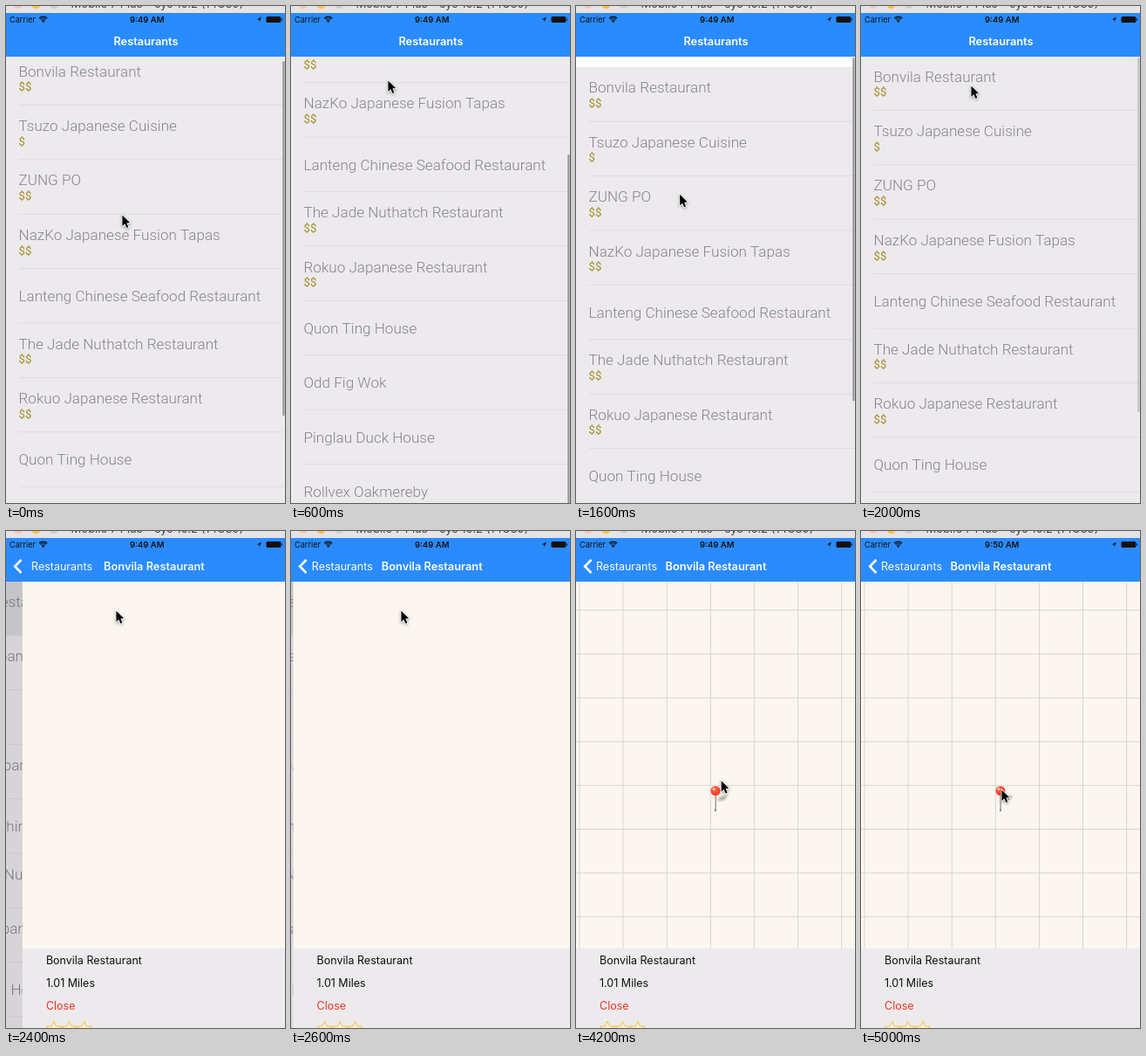
An HTML page with a canvas that plays this animation: 320 by 569 pixels, repeating every 5.1 s.

```html
<!DOCTYPE html>
<html lang="en">
<head>
<meta charset="utf-8">
<title>Restaurants</title>
<style>
  html, body { margin: 0; width: 100%; height: 100%; overflow: hidden; background: #edeaee; }
  canvas { display: block; width: 100vw; height: 100vh; }
</style>
</head>
<body>
<canvas id="stage"></canvas>
<script>
const W = 320, H = 569, LOOP = 5100, STEP = 100;
const BAR_TOP = 8, BAR_BOTTOM = 58, LIST_TOP = 57, ROW = 62.4, PANEL_TOP = 478;
const PUSH_START = 2120, MAP_LOADED = 2750, MINUTE_TURN = 4400;
const BLUE = '#2a8bff', PALE = '#edeaee', INK = '#111';
const UI = 'Inter, sans-serif';
const LIGHT = '300 17.1px Roboto, "Liberation Sans", sans-serif';
const PRICE = '13.2px Roboto, "Liberation Sans", sans-serif';

const places = [
  ['Bonvila Restaurant', '$$'],
  ['Tsuzo Japanese Cuisine', '$'],
  ['ZUNG PO', '$$'],
  ['NazKo Japanese Fusion Tapas', '$$'],
  ['Lanteng Chinese Seafood Restaurant', ''],
  ['The Jade Nuthatch Restaurant', '$$'],
  ['Rokuo Japanese Restaurant', '$$'],
  ['Quon Ting House', ''],
  ['Odd Fig Wok', ''],
  ['Pinglau Duck House', ''],
  ['Rollvex Oakmereby', '']
];

// Keyframes: [time, value...]
const scrollKeys = [[0, 6], [600, 156.5], [1200, -51], [1300, -51], [1750, 0]];
const scrollBarKeys = [[0, 1], [1850, 1], [2150, 0]];
const cursorKeys = [
  [0, 133, 239], [600, 111, 85], [1200, 113, 313], [1300, 113, 313],
  [1950, 126, 91], [2700, 126, 91], [3500, 168, 282], [3900, 168, 282], [4800, 161, 296]
];

const canvas = document.getElementById('stage');
const ctx = canvas.getContext('2d');
const ratio = window.devicePixelRatio || 1;
canvas.width = Math.round(W * ratio);
canvas.height = Math.round(H * ratio);

const smooth = u => (1 - Math.cos(Math.PI * u)) / 2;

function sample(keys, t) {
  const next = keys.findIndex(k => k[0] > t);
  if (next < 0) return keys[keys.length - 1].slice(1);
  const a = keys[next - 1], b = keys[next];
  const u = smooth((t - a[0]) / (b[0] - a[0]));
  return a.slice(1).map((v, i) => v + (b[i + 1] - v) * u);
}

function rect(x, y, w, h, color) {
  ctx.fillStyle = color;
  ctx.fillRect(x, y, w, h);
}

function text(str, x, y, font, color, align = 'left') {
  ctx.font = font;
  ctx.fillStyle = color;
  ctx.textAlign = align;
  ctx.fillText(str, x, y);
}

function polygon(points) {
  ctx.beginPath();
  points.forEach(([x, y]) => ctx.lineTo(x, y));
  ctx.closePath();
}

function disc(x, y, r, color) {
  ctx.fillStyle = color;
  ctx.beginPath();
  ctx.arc(x, y, r, 0, 7);
  ctx.fill();
}

function line(x1, y1, x2, y2, color, width = 1) {
  ctx.strokeStyle = color;
  ctx.lineWidth = width;
  ctx.beginPath();
  ctx.moveTo(x1, y1);
  ctx.lineTo(x2, y2);
  ctx.stroke();
}

function drawList(scroll, selected) {
  const top = LIST_TOP - scroll;
  rect(0, LIST_TOP, W, H - LIST_TOP, '#fff');
  rect(0, Math.max(top, LIST_TOP), W, H, PALE);
  places.forEach(([name, price], i) => {
    const y = top + i * ROW;
    if (i === selected) rect(0, y, W, ROW, '#d9d8da');
    text(name, 14.5, y + (price ? 29.6 : 37.5), LIGHT, '#86848a');
    text(price, 14.5, y + 46.3, PRICE, '#9d8c1c');
    rect(14.5, y + ROW - 0.5, W, 1, '#dfdce0');
  });
}

function drawScrollBar(scroll, alpha) {
  const y = 59 + Math.max(scroll, 0) * 0.71;
  ctx.globalAlpha = alpha;
  ctx.fillStyle = '#98969a';
  ctx.beginPath();
  ctx.roundRect(317.3, y, 2.3, 406 + Math.min(scroll, 0), 1.1);
  ctx.fill();
  ctx.globalAlpha = 1;
}

function drawPin() {
  ctx.save();
  ctx.translate(168, 306);
  ctx.rotate(-0.4);
  ctx.scale(1, 0.5);
  const shade = ctx.createRadialGradient(0, 0, 0, 0, 0, 8);
  shade.addColorStop(0, 'rgba(60,55,50,.45)');
  shade.addColorStop(1, 'rgba(60,55,50,0)');
  disc(0, 0, 8, shade);
  ctx.restore();
  line(160, 302, 160, 320, '#a3a09d', 2);
  line(159.6, 302, 159.6, 318, '#d2d0ce', 0.8);
  disc(160, 320, 1, '#77736f');
  const red = ctx.createRadialGradient(158, 295, 1, 160, 297.5, 6);
  red.addColorStop(0, '#ff6a50');
  red.addColorStop(1, '#f23a22');
  disc(160, 297.5, 5.5, red);
  disc(158, 295.6, 1.4, '#ffd5cb');
}

function drawStar(cx, cy) {
  polygon(Array.from({ length: 10 }, (_, i) => {
    const a = i * Math.PI / 5 - Math.PI / 2, r = i % 2 ? 4 : 9;
    return [cx + r * Math.cos(a), cy + r * Math.sin(a)];
  }));
  ctx.fillStyle = '#f8f1d4';
  ctx.strokeStyle = '#f1c640';
  ctx.lineWidth = 1;
  ctx.fill();
  ctx.stroke();
}

function drawDetail(x, loaded) {
  ctx.save();
  ctx.translate(x, 0);
  rect(0, LIST_TOP, W, H, '#fbf6f0');
  if (loaded) {
    for (let i = 0; i < 8; i++) {
      const gx = 4 + i * 50.1, gy = 90.7 + i * 50.15;
      line(gx, LIST_TOP, gx, PANEL_TOP, '#dad5cf');
      line(0, gy, W, gy, '#dad5cf');
    }
    drawPin();
  }
  rect(0, PANEL_TOP, W, H, PALE);
  const font = '12.5px ' + UI;
  text(places[0][0], 27, 496, font, INK);
  text('1.01 Miles', 27, 522, font, INK);
  text('Close', 27, 548, font, '#e8371d');
  [36, 53.5, 71].forEach(sx => drawStar(sx, 570));
  ctx.restore();
}

function drawStatus(t) {
  text('Carrier', 4, 19, '9.2px ' + UI, INK);
  text(t < MINUTE_TURN ? '9:49 AM' : '9:50 AM', 161.7, 19, '600 9.5px ' + UI, INK, 'center');
  ctx.strokeStyle = INK;
  ctx.lineWidth = 1.3;
  [2.6, 4.7, 6.7].forEach(r => {
    ctx.beginPath();
    ctx.arc(42.7, 18.8, r, -Math.PI * 0.74, -Math.PI * 0.26);
    ctx.stroke();
  });
  disc(42.7, 18.2, 0.9, INK);
  polygon([[293, 12.5], [287.5, 15.4], [290.3, 15.6], [290.5, 18.4]]);
  ctx.fillStyle = INK;
  ctx.fill();
  ctx.beginPath();
  ctx.roundRect(298.5, 12, 16.8, 7, 1.5);
  ctx.fill();
  rect(315.8, 14.2, 1, 2.6, INK);
}

// rest: 1 while the list is shown, falling to 0 once the detail has arrived
function drawNav(t, rest) {
  rect(0, BAR_TOP, W, BAR_BOTTOM - BAR_TOP, BLUE);
  drawStatus(t);
  const bold = '600 12.8px ' + UI;
  ctx.globalAlpha = rest;
  text('Restaurants', 160.5 - 102 * (1 - rest), 45, bold, '#fff', 'center');
  ctx.globalAlpha = 1 - rest;
  text('Restaurants', 23 + 102 * rest, 45, '12.5px ' + UI, '#fff');
  text(places[0][0], 160.5 + 160 * rest, 45, bold, '#fff', 'center');
  ctx.strokeStyle = '#fff';
  ctx.lineWidth = 2.6;
  ctx.beginPath();
  ctx.moveTo(17.5, 33);
  ctx.lineTo(10.2, 40.5);
  ctx.lineTo(17.5, 48);
  ctx.stroke();
  ctx.globalAlpha = 1;
}

function drawWindowTop() {
  rect(0, 0, W, BAR_TOP, '#e6e3e5');
  ['#f5c4b8', '#fcbf3f', '#cfcdcf'].forEach((c, i) => disc(14 + i * 20.5, -2.2, 5.2, c));
  text('Mobile 7 Plus – sys 10.2 (14C89)', 173.5, 1.5, '13px ' + UI, '#444', 'center');
}

function drawCursor(x, y) {
  ctx.save();
  ctx.translate(x, y);
  ctx.scale(0.86, 0.86);
  polygon([[0.5, 0.5], [0.5, 15], [3.8, 12], [6.4, 17.4], [8.6, 16.4], [6.2, 11], [10.6, 10.6]]);
  ctx.shadowColor = 'rgba(0,0,0,.4)';
  ctx.shadowBlur = 3 * ratio;
  ctx.shadowOffsetY = ratio;
  ctx.strokeStyle = '#fff';
  ctx.lineWidth = 1.8;
  ctx.stroke();
  ctx.shadowColor = 'transparent';
  ctx.fillStyle = '#000';
  ctx.fill();
  ctx.restore();
}

function draw(t) {
  const rest = t < PUSH_START ? 1 : t < 2900 ? Math.exp((PUSH_START - t) / 99) : 0;
  const [scroll] = sample(scrollKeys, t);
  ctx.setTransform(canvas.width / W, 0, 0, canvas.height / H, 0, 0);
  if (rest > 0) {
    ctx.save();
    ctx.translate(-0.3 * W * (1 - rest), 0);
    drawList(scroll, t >= 2050 ? 0 : -1);
    drawScrollBar(scroll, sample(scrollBarKeys, t)[0]);
    ctx.restore();
  }
  if (rest < 1) {
    rect(0, LIST_TOP, W, H, `rgba(0,0,0,${0.1 * (1 - rest)})`);
    drawDetail(W * rest, t >= MAP_LOADED);
  }
  drawNav(t, rest);
  drawWindowTop();
  drawCursor(...sample(cursorKeys, t));
}

const start = performance.now();
function tick() {
  const t = (performance.now() - start) % LOOP;
  draw(Math.floor(t / STEP) * STEP);
  requestAnimationFrame(tick);
}
tick();
</script>
</body>
</html>
```
